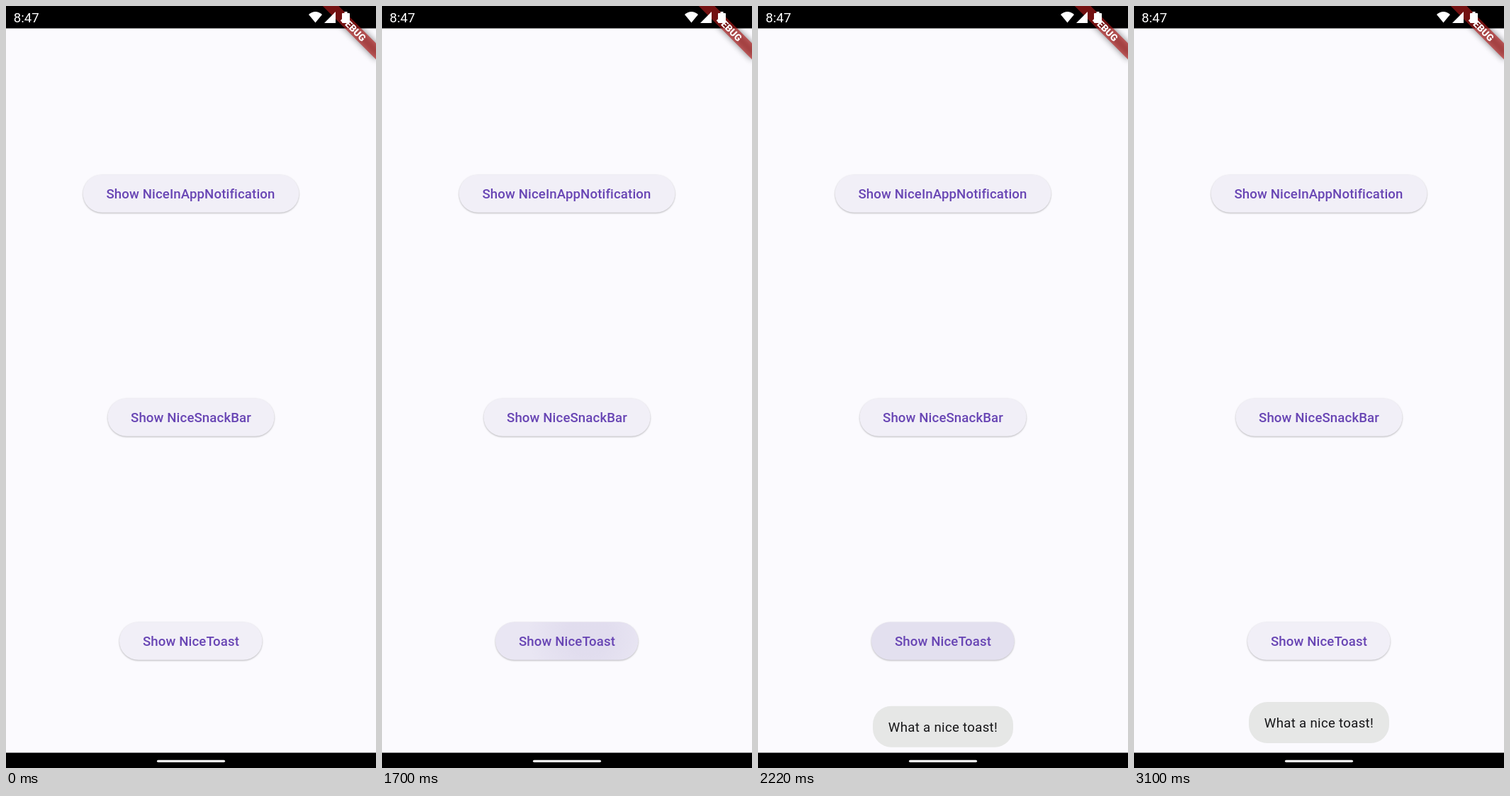
Write an HTML page that moves like this. It is 522 px wide and 1073 px high and loops after 8000 ms.

```html
<!DOCTYPE html>
<html lang="en">
<head>
<meta charset="utf-8">
<style>
  html, body { margin: 0; width: 100%; height: 100%; overflow: hidden; background: #fbfafe; }
  svg { display: block; width: 100%; height: 100%; }
  text { font: 400 18.6px Roboto, sans-serif; text-anchor: middle; }
  .button { fill: #f1eff7; filter: drop-shadow(0 1.3px 1px rgba(0, 0, 0, .27)); }
  .label { font-weight: 500; letter-spacing: .133px; fill: #6845b4; }
  .message { letter-spacing: .33px; fill: #161618; }
  .debug { font-size: 13.56px; font-weight: 900; fill: #fff; }
  .ribbon-shadow { filter: blur(5px); }
</style>
</head>
<body>
<svg viewBox="0 0 522 1073">
  <defs>
    <clipPath id="pressArea"><rect x="160" y="867.5" width="201.5" height="53.3" rx="26.6"/></clipPath>
    <radialGradient id="spotFill">
      <stop offset=".35" stop-color="#6750a4" stop-opacity="1"/>
      <stop offset="1" stop-color="#6750a4" stop-opacity="0"/>
    </radialGradient>
  </defs>
  <rect width="522" height="1073" fill="#fbfafe"/>

  <rect class="button" x="108.7" y="237.5" width="304.6" height="53.3" rx="26.6"/>
  <text class="label" x="260.5" y="271">Show NiceInAppNotification</text>
  <rect class="button" x="143.5" y="552.5" width="235" height="53.3" rx="26.6"/>
  <text class="label" x="261" y="586">Show NiceSnackBar</text>
  <rect class="button" x="160" y="867.5" width="201.5" height="53.3" rx="26.6"/>
  <g clip-path="url(#pressArea)" fill="#6750a4">
    <rect id="highlight" x="160" y="867" width="202" height="55"/>
    <circle id="spot" cx="290" cy="884" fill="url(#spotFill)"/>
  </g>
  <text class="label" x="261" y="901">Show NiceToast</text>

  <g id="toast">
    <rect x="162" width="198" height="58" rx="26" fill="#e6e7e6"/>
    <text class="message" x="261" y="36">What a nice toast!</text>
  </g>

  <rect width="522" height="31.5"/>
  <rect y="1051.5" width="522" height="22"/>
  <rect x="213" y="1061.7" width="96" height="3.2" rx="1.6" fill="#fff"/>

  <g transform="translate(522 0) rotate(45)">
    <rect class="ribbon-shadow" x="-53.2" y="37.2" width="106.4" height="16" opacity=".5"/>
    <rect x="-53.2" y="37.2" width="106.4" height="16" fill="#b71c1c" opacity=".63"/>
    <text class="debug" y="50">DEBUG</text>
  </g>

  <g fill="#fff">
    <text x="28.8" y="23">8:47</text>
    <path d="M427 12Q436.5 4 446 12L436.5 23.5Z"/>
    <path d="M465 8V24H449Z"/>
    <path d="M475 10H477.5V8H481.5V10H484Q485 10 485 11V23Q485 24 484 24H475Q474 24 474 23V11Q474 10 475 10Z"/>
  </g>
</svg>
<script>
const LOOP = 8000;
const byId = id => document.getElementById(id);
const toast = byId('toast'), highlight = byId('highlight'), spot = byId('spot');

// Each key is [time, value]; values are linear between keys and held outside them.
const highlightKeys = [[1400, 0], [1560, .045], [1700, .06], [1840, .06], [1940, .115],
  [2100, .115], [2360, .08], [2660, .05], [2920, .05], [3100, 0]];
const spotRadius = [[1480, 8], [1560, 32], [1700, 85], [1840, 85], [1940, 220]];
const spotOpacity = [[1480, 0], [1560, .085], [1700, .06], [1840, .06], [1940, 0]];

function valueAt(keys, t) {
  if (t <= keys[0][0]) return keys[0][1];
  for (let i = 1; i < keys.length; i++) {
    const [t0, v0] = keys[i - 1], [t1, v1] = keys[i];
    if (t < t1) return v0 + (v1 - v0) * (t - t0) / (t1 - t0);
  }
  return keys[keys.length - 1][1];
}

function toastTop(t) {
  const start = 1820, end = 2617;
  const left = Math.min(1, Math.max(0, (end - t) / (end - start)));
  return 980 + 93 * left ** 4;
}

function draw(t) {
  highlight.setAttribute('opacity', valueAt(highlightKeys, t));
  spot.setAttribute('r', valueAt(spotRadius, t));
  spot.setAttribute('opacity', valueAt(spotOpacity, t));
  toast.setAttribute('transform', `translate(0 ${toastTop(t)})`);
}

const begin = performance.now();
function tick() {
  draw((performance.now() - begin) % LOOP);
  requestAnimationFrame(tick);
}
tick();
</script>
</body>
</html>
```
